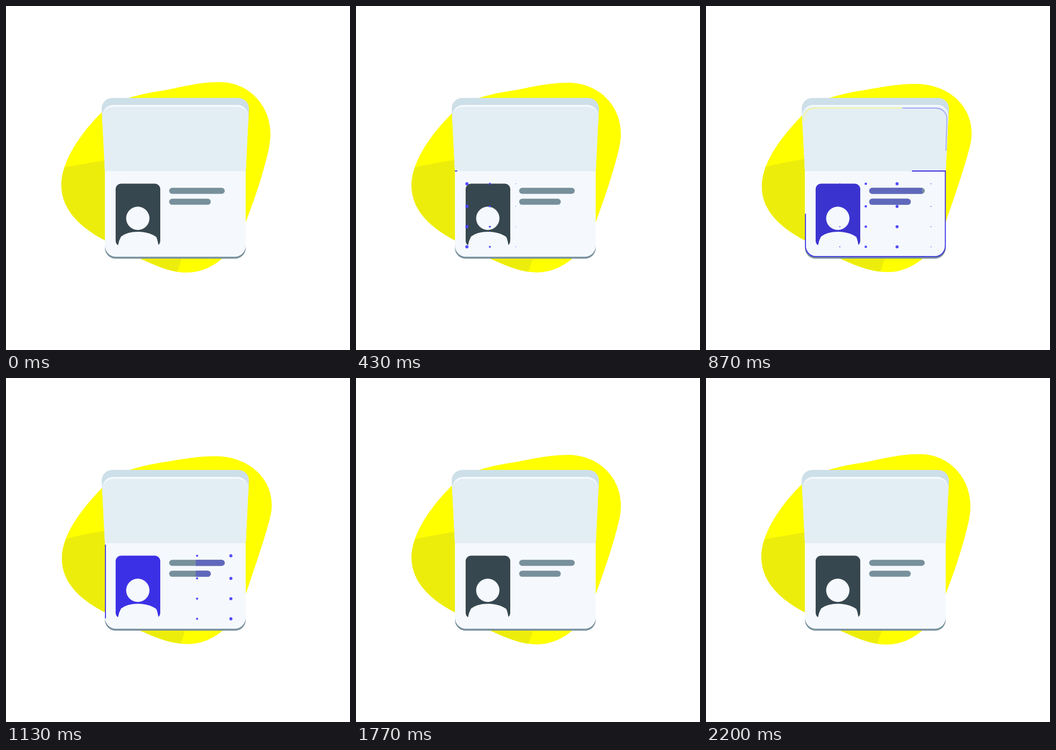
Recreate the animation shown at these times as an HTML page. Size 640 by 640 pixels, loop 2230 ms.

```html
<!DOCTYPE html>
<html lang="en">
<head>
<meta charset="utf-8">
<title>Passport scan</title>
<style>
  @property --from { syntax: "<number>"; inherits: false; initial-value: 0; }
  @property --to { syntax: "<number>"; inherits: false; initial-value: 0; }
  @property --r { syntax: "<length>"; inherits: true; initial-value: 0px; }

  html, body { margin: 0; width: 100%; height: 100%; overflow: hidden; background: #fff; }
  svg { display: block; width: 100%; height: 100%; }

  .blob, .shade, .trim, .photo, .sweep, .col {
    animation-duration: 2230ms;
    animation-iteration-count: infinite;
    animation-timing-function: ease-in-out;
  }

  /* Background shape */
  .blob { animation-name: blob; }
  .shade { animation-name: shade; }
  @keyframes blob {
    0%, 100% { d: path("M178 198 C145 230 103 285 103 333 C103 380 140 413 184 436 C206 447 228 459 250 470 C280 484 308 496 335 496 C362 496 385 485 403 469 C424 449 436 428 446 402 C460 366 474 325 483 290 C488 271 492 255 492 238 C492 185 452 141.5 397 141.5 C355 141.5 320 153 285 158.5 C262 162 245 166 228 171 C208 178 192 185 178 198 Z"); }
    50% { d: path("M178 205 C145 240 104 288 104 336 C104 382 140 413 184 436 C206 447 228 459 250 470 C280 484 308 495 338 495 C363 495 385 485 403 470 C424 449 436 428 446 402 C460 361 474 320 485 283 C490 265 494.5 252 494.5 236 C494.5 185 450 145.5 389 145.5 C350 145.5 318 153 285 158 C262 162 246 166 230 171 C208 178 192 190 178 205 Z"); }
  }
  @keyframes shade {
    0%, 100% { d: path("M80 304.8 Q146 293.5 184 287 L327 470 L317 500 L80 500 Z"); }
    50% { d: path("M80 308 Q140 290 184 284.5 L333 470 L323.5 500 L80 500 Z"); }
  }

  /* Travelling outlines: --from and --to are percentages of the path */
  .trim {
    fill: none;
    stroke: #3a30e0;
    stroke-width: 1.8;
    stroke-dasharray: 0px calc(var(--from) * 1px) calc((var(--to) - var(--from)) * 1px) 300px;
  }
  .page { animation-name: page-to, page-from; }
  @keyframes page-to { 0%, 17.9% { --to: 0; } 44.8%, 100% { --to: 100; } }
  @keyframes page-from {
    0%, 31.4% { --from: 0; animation-timing-function: cubic-bezier(.3, 0, .3, 1); }
    64.8%, 100% { --from: 100; }
  }
  .cover { stroke: #4a42ff; animation-name: cover-to, cover-from, cover-fade; }
  @keyframes cover-to { 0%, 27.4% { --to: 0; } 41.9%, 100% { --to: 100; } }
  @keyframes cover-from { 0%, 28.9% { --from: 0; } 47%, 100% { --from: 100; } }
  @keyframes cover-fade {
    0%, 32.7% { opacity: .85; animation-timing-function: linear; }
    39% { opacity: .4; }
    45%, 100% { opacity: 0; }
  }
  .trail { stroke: #ffff3c; stroke-width: 2.6; opacity: .4; animation-name: trail-to, trail-from; }
  @keyframes trail-to { 0%, 30.6% { --to: 0; } 45.7%, 100% { --to: 100; } }
  @keyframes trail-from { 0%, 33.6% { --from: 0; } 51.6%, 100% { --from: 100; } }

  /* Portrait and text bars */
  .photo { animation-name: photo; animation-timing-function: linear; }
  @keyframes photo {
    0%, 26.5%, 70%, 100% { fill: #37474f; }
    32.7% { fill: #393d8e; }
    39% { fill: #3b33cf; }
    45.7% { fill: #3c2fee; }
    51.6% { fill: #3c30e5; }
    61.4% { fill: #3a3f83; }
  }
  .sweep { animation-name: sweep; animation-timing-function: ease-out; }
  @keyframes sweep {
    0%, 22.4% { x: 304px; width: 0; }
    42.6%, 47.1% { x: 304px; width: 103px; }
    58.3%, 100% { x: 407px; width: 0; }
  }

  /* Dot columns */
  .col { fill: #4a42ff; fill-opacity: .95; }
  .col circle { r: var(--r); }
  .c0 { animation-name: c0; }
  .c1 { animation-name: c1; }
  .c2 { animation-name: c2; }
  .c3 { animation-name: c3; }
  .c4 { animation-name: c4; }
  @keyframes c0 { 0%, 6.7%, 40.1%, 100% { --r: 0px; } 20.2% { --r: 3px; } }
  @keyframes c1 { 0%, 9.9%, 48.4%, 100% { --r: 0px; } 26% { --r: 2.9px; } }
  @keyframes c2 { 0%, 12.6%, 52%, 100% { --r: 0px; } 33.2% { --r: 2.9px; } }
  @keyframes c3 { 0%, 25.1%, 68.2%, 100% { --r: 0px; } 40.1% { --r: 2.9px; } }
  @keyframes c4 { 0%, 32.3%, 75.4%, 100% { --r: 0px; } 50.4% { --r: 2.9px; } }
</style>
</head>
<body>
<svg viewBox="0 0 640 640">
  <defs>
    <clipPath id="inBlob"><path class="blob"/></clipPath>
    <clipPath id="inSweep"><rect class="sweep" y="330" height="50"/></clipPath>
    <g id="bars">
      <rect x="303.5" y="338.3" width="103.5" height="11.2" rx="5.6"/>
      <rect x="303.5" y="358.6" width="77.5" height="11.2" rx="5.6"/>
    </g>
    <path id="coverLine" pathLength="100" d="M186 307 L181.5 210 A20.5 20 0 0 1 202 190 H428 A20.5 20 0 0 1 448.3 210 L445 307"/>
  </defs>

  <path class="blob" fill="#ff0"/>
  <g clip-path="url(#inBlob)"><path class="shade" fill="#eded0c"/></g>

  <!-- passport -->
  <path fill="#cddfe8" d="M178 191 A20 20 0 0 1 198 171 H432 A20 20 0 0 1 452 191 L451 215 H179 Z"/>
  <path fill="#f5f9fd" d="M179 206 A20 22 0 0 1 199 184 H431 A20 22 0 0 1 451 206 L446 307 H184 Z"/>
  <path fill="#e3eef4" d="M179 207.5 A20 20 0 0 1 199 187.5 H431 A20 20 0 0 1 451 207.5 L446 308 H184 Z"/>
  <path fill="#78909c" d="M184 400 H446 V450 A20 20 0 0 1 426 470 H204 A20 20 0 0 1 184 450 Z"/>
  <path fill="#f5f9fd" d="M184 307.3 H446 V446 A20.5 20.5 0 0 1 425.5 466.5 H204.5 A20.5 20.5 0 0 1 184 446 Z"/>

  <path class="photo" d="M204 340.5 A10 10 0 0 1 214 330.5 H277 A10 10 0 0 1 287 340.5 V436 Q287 442 283.5 444.5 Q282 435 279.5 429.5 Q266 420 246 420 Q225 420 214 429 Q210 436 208.5 445 Q204 442 204 437 Z"/>
  <circle cx="245.2" cy="395" r="21.7" fill="#f5f9fd"/>
  <use href="#bars" fill="#78909c"/>
  <g clip-path="url(#inSweep)"><use href="#bars" fill="#6068bc"/></g>

  <!-- scan -->
  <path class="trim trail" pathLength="100" d="M186 307 L181.5 210 A20.5 20 0 0 1 202 190 H428 A20.5 20 0 0 1 448.3 210 L445 307"/>
  <path class="trim cover" pathLength="100" d="M186 307 L181.5 210 A20.5 20 0 0 1 202 190 H428 A20.5 20 0 0 1 448.3 210 L445 307"/>
  <path class="trim page" pathLength="100" d="M184 307 H445.3 V446 A20 20 0 0 1 425.3 466.2 H205 A20 20 0 0 1 185 446 V310"/>
  <g id="dots"></g>
</svg>
<script>
  const rows = [330.7, 372.8, 410.6, 448];
  document.getElementById("dots").innerHTML = [206.3, 249, 297.3, 355.5, 418.4]
    .map((x, i) => `<g class="col c${i}">${rows.map(y => `<circle cx="${x}" cy="${y}"/>`).join("")}</g>`)
    .join("");
</script>
</body>
</html>
```
